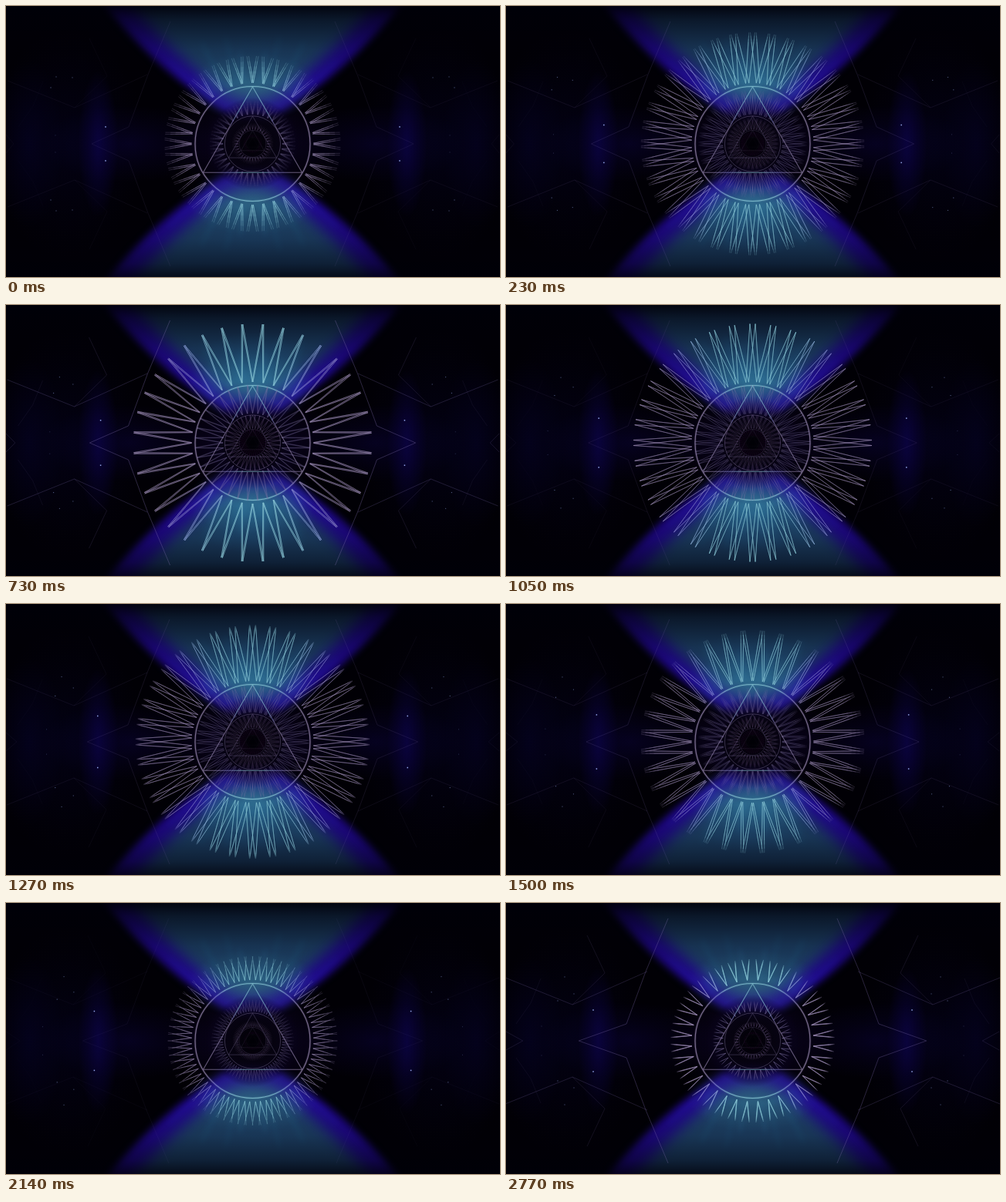
An HTML page with a canvas for the animation above (2.81 s loop, 640 by 352 pixels).

```html
<!DOCTYPE html>
<html lang="en">
<head>
<meta charset="utf-8">
<title>Kaleidoscope sun</title>
<style>
html, body { margin: 0; width: 100%; height: 100%; overflow: hidden; background: #000; }
canvas { display: block; width: 640px; height: 352px; }
</style>
</head>
<body>
<canvas id="stage" width="640" height="352"></canvas>
<script>
const W = 640, H = 352, CX = 319.5, CY = 179, LOOP = 2810, TAU = Math.PI * 2;
const INNER = 79, OUTER = 154.5;
const ctx = document.getElementById('stage').getContext('2d');

// [time, value] pairs
const reachKeys = [[0, 114], [100, 129], [250, 147], [400, OUTER], [1150, OUTER],
  [1300, 151], [1500, 145], [1800, 125], [2000, 114], [2140, 110], [2400, 107], [2810, 106]];
const smearKeys = [[0, 20], [250, 12], [400, 0], [1150, 0], [1500, 16], [2140, 16], [2810, 6]];
const webKeys = [[0, .25], [450, .55], [730, .8], [1050, .28], [1500, .4], [2140, .17], [2600, .55], [2770, .75]];

function keyed(keys, t) {
  for (let i = 1; i < keys.length; i++) {
    const [t0, a] = keys[i - 1], [t1, b] = keys[i];
    if (t <= t1) return a + (b - a) * (t - t0) / (t1 - t0);
  }
  return keys[keys.length - 1][1];
}

// Repeats a drawing in all four mirrored quadrants
function mirrored(g, draw) {
  for (const sx of [1, -1]) for (const sy of [1, -1]) {
    g.save();
    g.translate(CX, CY);
    g.scale(sx, sy);
    g.translate(-CX, -CY);
    draw(g);
    g.restore();
  }
}

function glow(g, x, y, rx, ry, rgb, alpha) {
  g.save();
  g.translate(x, y);
  g.scale(rx, ry);
  const fill = g.createRadialGradient(0, 0, 0, 0, 0, 1);
  fill.addColorStop(0, `rgba(${rgb},${alpha})`);
  fill.addColorStop(.5, `rgba(${rgb},${alpha * .45})`);
  fill.addColorStop(1, `rgba(${rgb},0)`);
  g.fillStyle = fill;
  g.fillRect(-1, -1, 2, 2);
  g.restore();
}

// Curved beam through an upper point, a bend, a waist and a tip on the axis
function fan(g, [topX, bendX, bendY, waistX, waistY, tipY], color, blur) {
  g.filter = `blur(${blur}px)`;
  g.fillStyle = color;
  for (const s of [1, -1]) {
    const y = v => CY + s * (v - CY);
    const m = x => 2 * CX - x;
    g.beginPath();
    g.moveTo(topX - 22, y(-20));
    g.lineTo(topX, y(8));
    g.quadraticCurveTo(bendX, y(bendY), waistX, y(waistY));
    g.quadraticCurveTo(CX - 30, y(tipY), CX, y(tipY));
    g.quadraticCurveTo(CX + 30, y(tipY), m(waistX), y(waistY));
    g.quadraticCurveTo(m(bendX), y(bendY), m(topX), y(8));
    g.lineTo(m(topX) + 22, y(-20));
    g.fill();
  }
  g.filter = 'none';
}

function rays(g) {
  g.save();
  g.globalCompositeOperation = 'lighter';
  g.filter = 'blur(3px)';
  g.lineWidth = 5;
  mirrored(g, () => {
    for (let i = 0; i < 7; i++) {
      const a = (8 + i * 6.2) * Math.PI / 180;
      const far = 120 + 35 * Math.sin(i * 2.4);
      g.strokeStyle = `rgba(20,75,90,${.13 + .07 * Math.sin(i * 4)})`;
      g.beginPath();
      g.moveTo(CX - 80 * Math.sin(a), CY - 80 * Math.cos(a));
      g.lineTo(CX - far * Math.sin(a), CY - far * Math.cos(a));
      g.stroke();
    }
  });
  g.restore();
}

function makeBackdrop() {
  const c = document.createElement('canvas');
  c.width = W;
  c.height = H;
  const g = c.getContext('2d');
  g.fillStyle = '#010005';
  g.fillRect(0, 0, W, H);
  for (const s of [-1, 1]) {
    glow(g, CX + s * 200, CY, 26, 95, '20,6,125', .48);
    glow(g, CX + s * 160, CY, 115, 50, '13,4,70', .4);
    glow(g, CX + s * 290, CY, 45, 110, '8,4,60', .35);
    glow(g, CX + s * 240, CY, 100, 150, '6,3,45', .35);
  }
  fan(g, [136, 187, 71, 252, 117, 147], 'rgb(32,8,142)', 5);
  fan(g, [172, 218, 62, 266, 98, 122], 'rgb(31,68,106)', 9);
  for (const s of [-1, 1]) glow(g, CX, CY + s * 74, 85, 45, '55,120,145', .5);
  rays(g);

  const shade = g.createLinearGradient(0, 0, 0, H);
  for (const [p, a] of [[0, .93], [.05, .65], [.16, .25], [.28, 0], [.74, 0], [.86, .22], [.95, .52], [1, .82]])
    shade.addColorStop(p, `rgba(0,0,8,${a})`);
  g.fillStyle = shade;
  g.fillRect(0, 0, W, H);

  glow(g, CX, CY, 100, 80, '34,10,95', .4);
  const core = g.createRadialGradient(CX, CY, 8, CX, CY, 60);
  core.addColorStop(0, 'rgba(3,1,8,.97)');
  core.addColorStop(.55, 'rgba(6,3,16,.85)');
  core.addColorStop(1, 'rgba(10,4,35,0)');
  g.fillStyle = core;
  g.fillRect(0, 0, W, H);
  return c;
}

function makeTint() {
  const tint = ctx.createConicGradient(-Math.PI / 2, 0, 0);
  const cyan = 'rgb(138,200,214)', blue = 'rgb(130,128,205)', lilac = 'rgb(152,136,176)';
  for (const [p, color] of [[0, cyan], [.065, cyan], [.115, blue], [.15, lilac]]) {
    for (const q of [p, .5 - p, .5 + p, 1 - p]) tint.addColorStop(q, color);
  }
  return tint;
}

const backdrop = makeBackdrop();
const tint = makeTint();

// Thirty-six Vs growing from the ring; at full reach their arms meet as a star
function burst(reach, turn) {
  const spread = Math.PI / 36, grown = (reach - INNER) / (OUTER - INNER);
  const point = (r, a) => [r * Math.sin(a), -r * Math.cos(a)];
  ctx.beginPath();
  for (let i = 0; i < 36; i++) {
    const a = turn + (2 * i + 1) * spread;
    const [x, y] = point(INNER, a);
    const arm = side => {
      const [ox, oy] = point(OUTER, a + side * spread);
      return [x + (ox - x) * grown, y + (oy - y) * grown];
    };
    ctx.moveTo(...arm(-1));
    ctx.lineTo(x, y);
    ctx.lineTo(...arm(1));
  }
  ctx.stroke();
}

function emblem(scale, alpha, t) {
  const reach = keyed(reachKeys, t), smear = keyed(smearKeys, t);
  const turn = (5.6 + t * 35 / LOOP) * Math.PI / 180;
  const ghosts = 4, small = scale < 1;
  ctx.save();
  ctx.translate(CX, CY);
  ctx.scale(scale, scale);
  ctx.strokeStyle = small ? 'rgb(135,122,165)' : tint;
  ctx.lineJoin = 'bevel';

  ctx.lineWidth = (small ? .65 : 1) / scale;
  ctx.globalAlpha = alpha * .95 / ghosts;
  for (let i = 0; i < ghosts; i++) {
    const r = reach - smear * i / (ghosts - 1);
    burst(r, turn);
    burst(r, -turn);
  }

  ctx.beginPath();
  ctx.arc(0, 0, 74.5, 0, TAU);
  ctx.lineWidth = (small ? 1 : 3.2) / scale;
  ctx.globalAlpha = alpha * .13;
  ctx.stroke();
  ctx.lineWidth = (small ? .8 : 1.2) / scale;
  ctx.globalAlpha = alpha * .75;
  ctx.stroke();

  ctx.beginPath();
  ctx.moveTo(0, -74);
  ctx.lineTo(64, 37.3);
  ctx.lineTo(-64, 37.3);
  ctx.closePath();
  ctx.lineWidth = (small ? .85 : 1.1) / scale;
  ctx.globalAlpha = alpha * .65;
  ctx.stroke();
  ctx.restore();
}

function web(t) {
  const p = Math.pow(t / LOOP, 1.4), d = -3 * p;
  const paths = [
    [[213 + d, 20], [184 + d, 89], [159 + d, 157], [111 - 17 * p, CY]],
    [[183, 89], [89 + d, 132], [2 + d, 97]],
    [[108 + d, 42], [131 + d, 91], [89 + d, 132]],
    [[48 + d, 98], [35 + d, 130], [16 + d, 157]],
    [[0, 167], [10 + 12 * p, CY]]
  ];
  const strength = [1, .7, .45, .25, .5];
  ctx.save();
  ctx.lineWidth = .65;
  ctx.strokeStyle = 'rgb(125,108,170)';
  mirrored(ctx, () => paths.forEach((points, i) => {
    ctx.globalAlpha = keyed(webKeys, t) * strength[i] * .7;
    ctx.beginPath();
    for (const [x, y] of points) ctx.lineTo(x, y);
    ctx.stroke();
  }));
  ctx.restore();
}

// x, y at the start, x, y at the end, size, brightness
const sparks = [
  [129, 157, 113, 139, 1.5, .9],
  [65, 92, 76, 96, 1.1, .45],
  [86, 93, 88, 118, 1.1, .45],
  [58, 106, 67, 127, 1.1, .5],
  [64, 168, 46, 160, 1, .25]
];

function drawSparks(t) {
  const p = 1 - Math.pow(1 - t / LOOP, 1.7);
  mirrored(ctx, () => {
    for (const [x0, y0, x1, y1, size, bright] of sparks) {
      ctx.fillStyle = `rgba(165,185,255,${bright})`;
      ctx.fillRect(x0 + (x1 - x0) * p - size / 2, y0 + (y1 - y0) * p - size / 2, size, size);
    }
  });
}

function draw(t) {
  ctx.drawImage(backdrop, 0, 0);
  // Extended spikes brighten the beams around the ring
  const lift = (keyed(reachKeys, t) - 105) / 50;
  ctx.save();
  ctx.globalCompositeOperation = 'lighter';
  for (const s of [-1, 1]) glow(ctx, CX, CY + s * 92, 82, 52, '12,60,75', .35 * lift);
  ctx.restore();
  web(t);
  drawSparks(t);
  [1, .485, .235, .114].forEach((scale, i) => emblem(scale, [1, .55, .28, .1][i], t));
  glow(ctx, CX, CY, 17, 17, '0,0,5', .95);
}

const start = performance.now();
function tick() {
  draw((performance.now() - start) % LOOP);
  requestAnimationFrame(tick);
}
draw(0);
requestAnimationFrame(tick);
</script>
</body>
</html>
```
